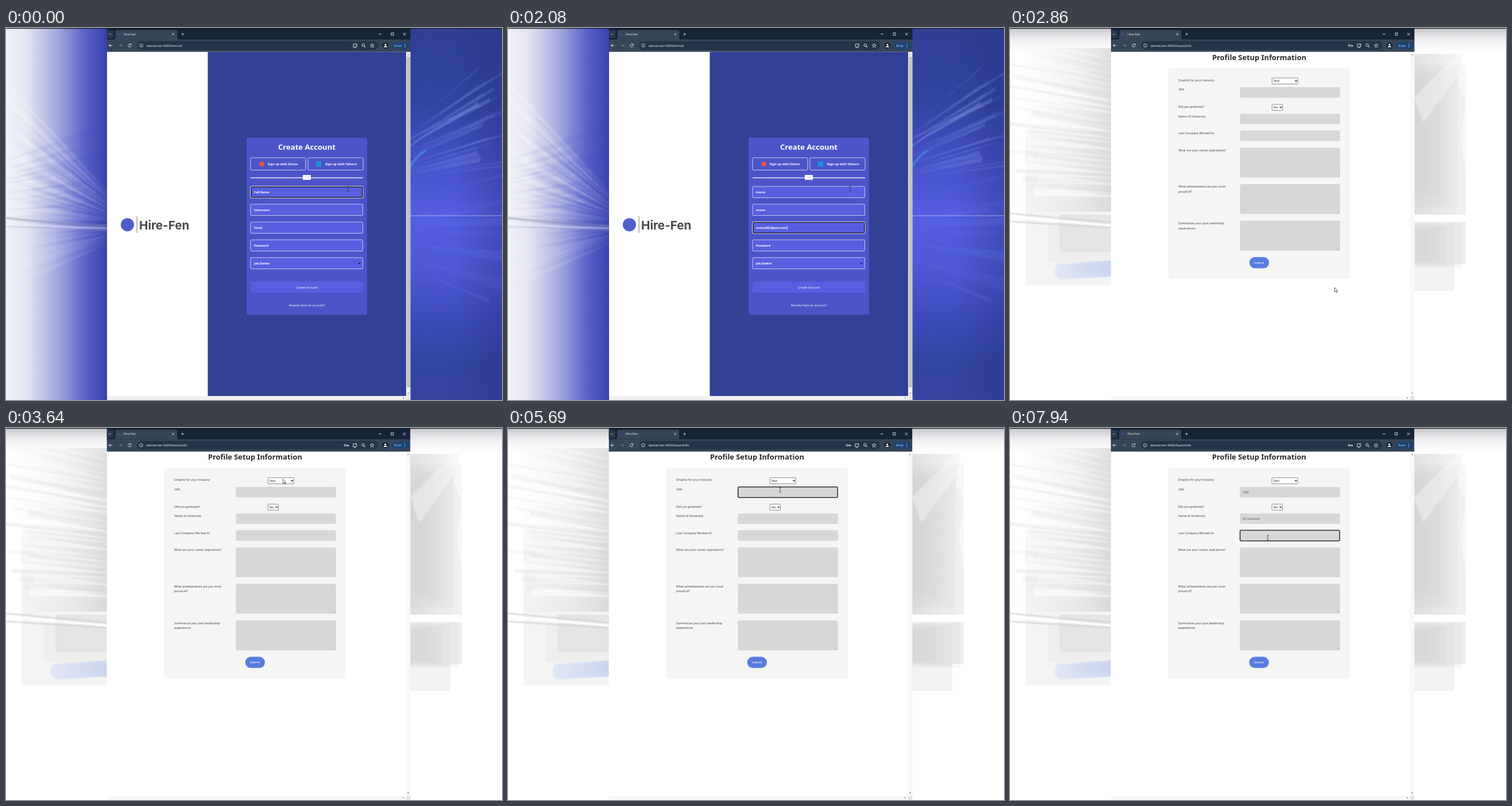
Recreate the animation shown at these times as an HTML page. Size 864x648 px, loop 8 s.

```html
<!DOCTYPE html>
<html lang="en">
<head>
<meta charset="utf-8">
<title>Sign-up walkthrough</title>
<style>
  html, body { margin: 0; width: 100%; height: 100%; overflow: hidden; background: #fff; }
  svg { display: block; width: 100vw; height: 100vh; }
  text { font-family: "Noto Sans", "Open Sans", sans-serif; white-space: pre; }
</style>
</head>
<body>
<svg id="stage" viewBox="0 0 864 648" preserveAspectRatio="none"></svg>
<script>
const LOOP = 8000, SETUP = 2860;
const BRAND = "Hire-Fen", HOST = "devserver:4200/";
const USER = "marta", MAIL = "marta482@post.test";
const SIGNUP_ROWS = [276, 307, 338, 369, 400];
const SIGNUP_HINTS = ["Full Name", "Username", "Email", "Password", "Job Seeker"];
const SETUP_ROWS = [[103, 18.5], [149.5, 18], [178.5, 18.5], [208.5, 52], [272, 52], [335.5, 52.5]];

// Markup helpers
const attrs = o => Object.entries(o).map(([k, v]) => ` ${k}="${v}"`).join("");
const rect = (x, y, width, height, fill, o = {}) => `<rect${attrs({ x, y, width, height, fill, ...o })}/>`;
const path = (d, stroke, w = 0.8, o = {}) =>
  `<path${attrs({ d, stroke, "stroke-width": w, fill: "none", ...o })}/>`;
const poly = (d, fill, o = {}) => `<path${attrs({ d, fill, ...o })}/>`;
const circle = (cx, cy, r, fill, o = {}) => `<circle${attrs({ cx, cy, r, fill, ...o })}/>`;
const text = (x, y, s, size, fill, o = {}) =>
  `<text${attrs({ x, y, "font-size": size, fill, ...o })}>${s}</text>`;
const group = (id, body, o = {}) => `<g${attrs({ id, ...o })}>${body}</g>`;
const mid = { "text-anchor": "middle" };
const bold = { "font-weight": 700 };

function gradient(id, vertical, ...stops) {
  const end = vertical ? 'x2="0" y2="1"' : 'x2="1" y2="0"';
  const body = stops.map(([at, color, alpha = 1]) =>
    `<stop offset="${at}" stop-color="${color}" stop-opacity="${alpha}"/>`).join("");
  return `<linearGradient id="${id}" x1="0" y1="0" ${end}>${body}</linearGradient>`;
}

function seeded(seed) {
  return () => (seed = (seed * 16807) % 2147483647) / 2147483647;
}

// Streaks fanning from one vertical edge; "from" and "to" are [x, top, bottom]
function rays(seed, count, from, to, color, alpha, width) {
  const rnd = seeded(seed);
  let out = "";
  for (let i = 0; i < count; i++) {
    const k = (i + rnd()) / count;
    const x = to[0] + (rnd() - 0.5) * 60;
    const y0 = from[1] + k * (from[2] - from[1]);
    const y1 = to[1] + k * (to[2] - to[1]);
    const w = width * (0.3 + rnd());
    out += poly(`M${from[0]} ${y0}L${x} ${y1 - w}L${x} ${y1 + w}Z`, color,
      { opacity: (alpha * (0.4 + rnd() * 0.6)).toFixed(2) });
  }
  return out;
}

const defs = `<defs>
  ${gradient("leftBlue", false, [0, "#f1f1f7"], [0.2, "#e4e5f2"], [0.5, "#a5aade"], [0.78, "#5a63c9"], [1, "#3642ad"])}
  ${gradient("rightBlue", true, [0, "#2f3f95"], [0.2, "#3142a0"], [0.36, "#4550c8"], [0.5, "#545ee0"], [0.64, "#4f59d6"], [0.78, "#3d4abb"], [0.9, "#3243a0"], [1, "#35439f"])}
  ${gradient("shade", false, [0, "#24337f", 0], [1, "#24337f", 0.4])}
  ${gradient("topGrey", true, [0, "#b9b9c0", 0.8], [0.4, "#dedee1", 0.5], [1, "#fff", 0])}
  ${gradient("greyIn", false, [0, "#e2e2e1", 0], [0.5, "#e2e2e1", 0.5], [1, "#d5d5d5", 0.85])}
  ${gradient("greyOut", false, [0, "#d6d6d6"], [0.45, "#e4e4e3"], [1, "#f5f5f4"])}
  ${gradient("smear", false, [0, "#e1e6f5"], [1, "#cbd5f1"])}
  <filter id="soft" x="-20%" y="-20%" width="140%" height="140%"><feGaussianBlur stdDeviation="1.2"/></filter>
  <clipPath id="sides"><path d="M0 0H176V648H0ZM704 0H864V648H704Z"/></clipPath>
</defs>`;

function blueBackdrop() {
  const fan = rays(71, 26, [190, 300, 338], [5, 90, 330], "#fff", 0.17, 7)
    + rays(19, 18, [190, 345, 372], [5, 350, 460], "#e6e8ff", 0.15, 6)
    + rays(33, 10, [0, 230, 330], [170, 180, 325], "#4450c4", 0.16, 8);
  const burst = rays(8, 26, [690, 185, 265], [850, 70, 245], "#91a5f3", 0.28, 3.5)
    + rays(45, 9, [700, 300, 420], [864, 250, 480], "#6c77ee", 0.22, 10);
  return rect(0, 0, 176, 648, "url(#leftBlue)")
    + rect(704, 0, 160, 648, "url(#rightBlue)")
    + rect(780, 0, 84, 648, "url(#shade)")
    + group("blueFans", fan + burst
      + path("M704 242Q712 225 732 213", "#459df0", 4, { opacity: 0.6 })
      + path("M704 193Q752 166 796 150M704 207Q770 150 830 135", "#a6b4f5", 1.2, { opacity: 0.5 })
      + path("M0 331Q90 341 176 344", "#858aa9", 3, { opacity: 0.55 })
      + path("M0 339Q90 347 176 349", "#f5f5ff", 3, { opacity: 0.5 })
      + path("M0 346Q90 349 176 353", "#8b90b7", 1.5, { opacity: 0.45 }), { filter: "url(#soft)" })
    + rect(704, 326.5, 160, 1, "#bec5f5", { opacity: 0.8 });
}

function greyBackdrop() {
  let steps = "";
  for (let i = 0; i < 5; i++) {
    steps += rect(704, 62 + i * 7, 90 - i * 15, 263 - i * 18, "#cfcfcf", { opacity: 0.16 });
    steps += rect(704, 339 + i * 3, 84 - i * 14, 78 - i * 6, "#c9c9c9", { opacity: 0.17 });
  }
  const streaks = rays(27, 24, [196, 60, 300], [20, 20, 290], "#fff", 0.65, 7)
    + rays(61, 14, [190, 100, 290], [15, 60, 285], "#bbbcbc", 0.2, 4);
  return rect(0, 0, 864, 648, "#fff")
    + rect(27, 180, 149, 268, "#f4f4f2")
    + rect(20, 35, 156, 285, "url(#greyIn)")
    + group("greyFan", streaks, { filter: "url(#soft)" })
    + rect(66, 340, 110, 68, "#eeeeec") + rect(86, 325, 90, 66, "#e4e4e3")
    + group("greyLines", path("M0 323L176 339M0 337L176 348", "#cfcfcf", 2)
      + path("M0 329L176 344", "#fff", 4)
      + poly("M82 411L176 405V433L86 438Q72 428 82 411Z", "url(#smear)"), { filter: "url(#soft)" })
    + poly("M704 45H790L780 95L794 130L785 190L794 250V325H704Z", "url(#greyOut)", { opacity: 0.75 })
    + rect(704, 338, 90, 73, "#eeeeec") + rect(704, 410, 70, 48, "#f2f2f0")
    + steps
    + poly("M704 120L795 30L815 35L720 165Z", "#fff", { opacity: 0.35, filter: "url(#soft)" })
    + rect(0, 1, 864, 50, "url(#topGrey)");
}

function browser() {
  const ink = "#dfe5ec", dim = "#7b8797";
  const star = [...Array(10)].map((_, i) => {
    const r = i % 2 ? 1.6 : 3.7, a = (i * 36 - 90) * Math.PI / 180;
    return `${(638 + r * Math.cos(a)).toFixed(1)} ${(30.7 + r * Math.sin(a)).toFixed(1)}`;
  }).join("L");
  return rect(176, 1, 528.5, 20, "#152338")
    + rect(176, 4, 11.5, 14, "#2b394c", { rx: 3 })
    + path("M179.4 10L181.2 11.8L183 10", ink)
    + poly("M188 20Q190.500 20 190.500 17V7Q190.500 3.500 194 3.500H295Q298.500 3.500 298.500 7V17Q298.500 20 301 20Z", "#364557")
    + circle(197, 11, 2.8, "#463f83")
    + text(205, 12.9, BRAND, 5.4, "#edf0f4")
    + path("M289.300 8.800L293.300 12.800M293.300 8.800L289.300 12.800M305.400 10.800H310.200M307.800 8.400V13.200", ink)
    + path("M649 10.700H654M671 8.500H675.200V12.700H671ZM692 8.500L696.500 13M696.500 8.500L692 13", "#fff")
    + rect(176, 20, 528.5, 21.5, "#364557")
    + rect(228.5, 23, 420, 15, "#25344a", { rx: 7.5 })
    + path("M185.200 30.500H179.500M182 28L179.500 30.500L182 33", ink, 1)
    + path("M196.500 30.500H202M199.500 28L202 30.500L199.500 33", dim, 0.9)
    + path("M217.800 28.900A2.700 2.700 0 1 0 218.100 31.500M218.200 27.500V29.400H216.200", ink, 1)
    + circle(235.6, 30.4, 3, "none", { stroke: ink, "stroke-width": 0.8 })
    + path("M235.600 30V32M235.600 28.700V29.200", ink, 0.8)
    + `<text id="url" x="245" y="32.700" font-size="6" fill="#eef1f5"></text>`
    + group("key", circle(591, 30.5, 1.7, "none", { stroke: ink, "stroke-width": 1 })
      + path("M592.700 30.500H597.300M595.300 30.500V32.500M597 30.500V32.300", ink, 1.1))
    + path("M610.500 28H605V33H611V31M606.500 34.300H609.500M610.700 27V30.200M609.400 29L610.700 30.300L612 29", ink, 0.9)
    + circle(622.2, 29.8, 2.2, "none", { stroke: ink, "stroke-width": 1 })
    + path("M623.900 31.500L626 33.600", ink, 1.1)
    + poly(`M${star}Z`, "none", { stroke: ink, "stroke-width": 0.8 })
    + circle(661, 30.5, 5.6, "#172538")
    + circle(661, 29, 1.6, "#fff") + poly("M658 33.500Q658 31.200 661 31.200T664 33.500Z", "#fff")
    + rect(672.5, 24, 30, 13, "#1c4474", { rx: 6.5 })
    + text(676.5, 32.5, "Error", 5.3, "#cfe2fa")
    + [28, 30.5, 33].map(y => circle(695, y, 0.7, "#d6e6fa")).join("");
}

function scrollbars(track, corner) {
  return rect(697, 41.5, 7.5, 600, track) + rect(176, 641, 528.5, 7, track)
    + rect(697, 641, 7.5, 7, corner)
    + poly("M699.200 47.300L700.800 45.300L702.400 47.300Z", "#888")
    + poly("M699.200 635.500L700.800 637.500L702.400 635.500Z", "#666")
    + poly("M691.500 643L693.500 644.600L691.500 646.200Z", "#777");
}

function signupPage() {
  const white = "#fff", edge = { stroke: "#d6d9f8", "stroke-width": 0.9, rx: 1.5 };
  const option = (x, label) => rect(x, 226, 96, 21.5, "#4b55c9", edge)
    + text(x + 29.7, 238.9, `Sign up with ${label}`, 5.5, white, bold);
  const fields = SIGNUP_ROWS.map((y, i) => rect(426, y, 195.5, 19.6, "#565fdf", edge)
    + `<text id="sign${i}" x="432" y="${y + 11.8}" font-size="5.3" font-weight="700" fill="#fff"></text>`).join("");
  return rect(176, 41.5, 175.5, 600, white) + rect(351.5, 41.5, 346, 600, "#314195")
    + scrollbars("#f1f1f1", "#e6e6e6") + rect(698, 50, 6, 576, "#c3c3c5")
    + circle(211.5, 342.7, 11.5, "#515ccc")
    + rect(227.6, 328, 1, 29, "#77777c")
    + text(232, 350.7, BRAND, 20.6, "#47474b", { "font-weight": 700, style: "font-family:Inter,'Noto Sans',sans-serif" })
    + rect(419, 191, 210, 308.5, "#4b55c9", { rx: 4 })
    + text(524, 211.8, "Create Account", 13.1, white, { ...mid, ...bold })
    + option(426, "Zivoro") + option(526, "Talvern")
    + circle(445.6, 236.8, 4.4, "#e1574b") + rect(540, 232.5, 9, 9, "#2390e3")
    + rect(426, 260.3, 196, 1.3, white) + rect(517, 256, 14, 8.5, white)
    + text(524, 262.3, "OR", 5.3, "#c9cbd9", mid)
    + fields + poly("M613.500 409L617.800 409L615.650 411.700Z", "#172052")
    + rect(426, 442, 196, 19, "#565fdf", { rx: 1.5 })
    + text(524, 453.5, "Create Account", 5.35, white, mid)
    + text(524, 485, "Already have an account?", 5.3, white, mid);
}

function setupPage() {
  const ink = "#3b3e42";
  const label = (y, s) => text(293.3, y, s, 5.25, ink);
  const picker = (y, w, s) => rect(456.5, y, w, 10.5, "#fff", { stroke: "#6e6e6e", "stroke-width": 0.8, rx: 0.8 })
    + text(458.7, y + 7.2, s, 5.2, "#222")
    + path(`M${451.6 + w} ${y + 4.2}l1.800 1.900l1.800 -1.900`, "#222", 1.1);
  const boxes = SETUP_ROWS.map(([y, h], i) => rect(400.7, y, 174.3, h, "#d7d7d6", { rx: 3 })
    + (h > 30 ? path(`M570.500 ${y + h - 1.5}l3 -3M572.300 ${y + h - 1.500}l1.200 -1.200`, "#8a8a8a", 0.5) : "")
    + (i < 3 ? `<text id="info${i}" x="405.500" y="${y + 11.300}" font-size="5.300" fill="#444"></text>` : "")).join("");
  return rect(176, 41.5, 528.5, 606.5, "#fff") + scrollbars("#f8f8f8", "#e3e3e3")
    + text(434.2, 55.8, "Profile Setup Information", 12.85, "#25292d", { ...mid, "font-weight": 600 })
    + rect(276, 70, 316.3, 367, "#f5f5f3", { rx: 4 })
    + label(92.8, "Droplist for your industry") + label(109.3, "GPA")
    + label(139, "Did you graduate?") + label(155.7, "Name of University")
    + label(185, "Last Company Worked At") + label(214.8, "What are your career aspirations?")
    + label(278, "What achievements are you most") + label(286.5, "proud of?")
    + label(342, "Summarize your past leadership") + label(350.5, "experiences")
    + picker(87, 45, "Tech") + picker(133, 18.3, "Yes") + boxes
    + rect(417, 399, 34.3, 19.5, "#567ddf", { rx: 9.7 })
    + text(434, 410.9, "Submit", 5.4, "#fff", mid);
}

const pointers = group("beam", path("M-1.800 -4.300Q0 -4.300 0 -3.300Q0 -4.300 1.800 -4.300M0 -3.500V3.500M-1.800 4.300Q0 4.300 0 3.300Q0 4.300 1.800 4.300", "#333", 0.8))
  + group("arrow", poly("M-1.500 -4V3.800L0.300 2.200L1.600 5L3 4.400L1.700 1.700H4Z", "#fff", { stroke: "#222", "stroke-width": 0.7 }))
  + group("hand", poly("M-1.800 -4.500Q-0.700 -5.500 0 -4.300V-1.300Q2.900 -1.300 4 0V3L2.700 5.300H-1.400L-4 1Q-3.500 -0.300 -1.800 1Z", "#fff", { stroke: "#252542", "stroke-width": 0.7 }));

const stage = document.getElementById("stage");
stage.innerHTML = defs
  + group("blueSide", blueBackdrop(), { "clip-path": "url(#sides)" })
  + group("greySide", greyBackdrop(), { "clip-path": "url(#sides)" })
  + group("window", group("signup", signupPage()) + group("setup", setupPage()) + browser()
    + group("focus", rect(0, 0, 0, 0, "none", { id: "halo", rx: 2, stroke: "#fff", "stroke-width": 1 })
      + rect(0, 0, 0, 0, "none", { id: "ring", rx: 2, stroke: "#111", "stroke-width": 1.3 }))
    + rect(0, 0, 0.7, 7, "#fff", { id: "caret" }))
  + rect(0, 0, 864, 1.2, "#10131c")
  + group("pointer", pointers);

const el = {};
stage.querySelectorAll("[id]").forEach(n => el[n.id] = n);
const show = (n, on) => n.setAttribute("display", on ? "inline" : "none");
const put = (n, o) => Object.entries(o).forEach(([k, v]) => n.setAttribute(k, v));

function tick(t) {
  if (t < 3640) return Math.floor(t / 260) * 260;
  return t < 5190 ? 3640 : 5190 + Math.floor((t - 5190) / 250) * 250;
}
const typed = (s, t, start, rate) => s.slice(0, Math.max(0, Math.floor((t - start) / rate)));
const last = (rows, t) => rows.filter(r => r[0] <= t).pop();

// [time, field index]
const SIGNUP_FOCUS = [[0, 0], [780, 1], [1300, 2], [2340, 3], [2600, -1]];
const SETUP_FOCUS = [[0, -1], [5690, 0], [7190, 1], [7940, 2]];
// [time, shape, x, y]
const POINTER = [[0, "beam", 596, 280], [2600, "hand", 521.5, 454], [2860, "arrow", 567, 456],
  [3120, "arrow", 540, 300], [3380, "arrow", 502, 150], [3640, "arrow", 484, 93],
  [5190, "beam", 492, 108.5], [5690, "beam", 474, 108], [7190, "beam", 457, 158], [7940, "beam", 449, 191]];

function render(ms) {
  const t = tick(ms), setup = t >= SETUP;
  show(el.blueSide, !setup);
  show(el.signup, !setup);
  show(el.greySide, setup);
  show(el.setup, setup);
  show(el.key, t >= 2340);
  put(el.window, { transform: t >= 3640 ? "translate(-.3 -.4)" : "" });
  el.url.textContent = HOST + (setup ? "basicInfo" : "enroll");

  const values = setup
    ? [typed("3.85", t, 5940, 250), typed("UC Larmont", t, 7100, 55), ""]
    : [typed(USER, t, 130, 70), typed(USER, t, 720, 60), typed(MAIL, t, 1204, 48), typed("•••", t, 2200, 45), ""];
  const prefix = setup ? "info" : "sign";
  values.forEach((v, i) => el[prefix + i].textContent = v || (setup ? "" : SIGNUP_HINTS[i]));

  const focus = last(setup ? SETUP_FOCUS : SIGNUP_FOCUS, t)[1];
  show(el.focus, focus >= 0);
  show(el.caret, focus >= 0 && values[focus]);
  if (focus >= 0) {
    const [x, y, w, h] = setup
      ? [401, SETUP_ROWS[focus][0], 173.5, SETUP_ROWS[focus][1]]
      : [427, SIGNUP_ROWS[focus] + 0.7, 194, 18.4];
    show(el.halo, !setup);
    put(el.ring, { x, y, width: w, height: h });
    put(el.halo, { x: x - 1, y: y - 1, width: w + 2, height: h + 2 });
    const field = el[prefix + focus];
    put(el.caret, {
      x: +field.getAttribute("x") + field.getComputedTextLength() + 0.3,
      y: +field.getAttribute("y") - 5.5,
      fill: setup ? "#222" : "#fff"
    });
  }

  const [, shape, x, y] = last(POINTER, t);
  ["beam", "arrow", "hand"].forEach(k => show(el[k], k === shape));
  put(el.pointer, { transform: `translate(${x} ${y})` });
}

const begin = performance.now();
function loop() {
  render((performance.now() - begin) % LOOP);
  requestAnimationFrame(loop);
}
loop();
</script>
</body>
</html>
```
